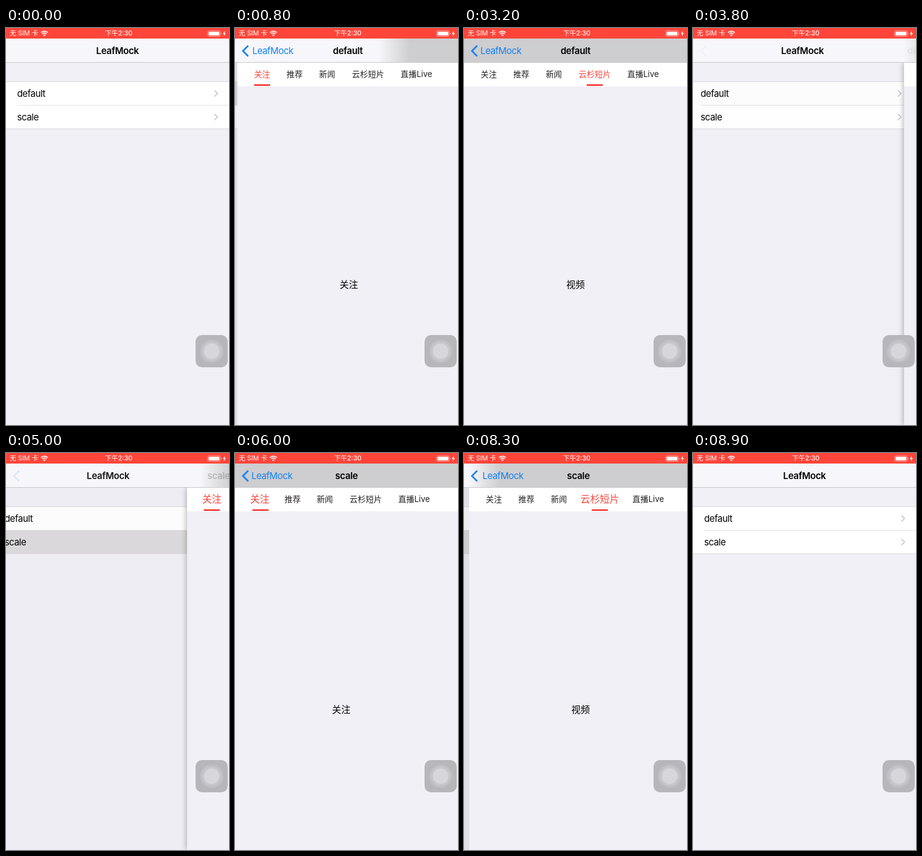
An HTML page that plays this animation: 360 px wide and 640 px high, repeating every 9300 ms.

```html
<!DOCTYPE html>
<html lang="zh">
<head>
<meta charset="utf-8">
<title>Tab pages</title>
<style>
  html, body { margin: 0; width: 100%; height: 100%; overflow: hidden; background: #f1f0f6; }
  #stage { position: relative; width: 360px; height: 640px; overflow: hidden; background: #f1f0f6;
    font: 14.8px/20px Inter, "Noto Sans CJK SC", "Noto Sans CJK", sans-serif; letter-spacing: -.45px; color: #000; }
  #stage div, #stage svg, #stage span { position: absolute; white-space: nowrap; }
  .fill { inset: 0; }
  .mid { transform: translate(-50%, -50%); }
  #list { left: 0; top: 56px; width: 360px; height: 584px; background: #f1f0f6; }
  #rows { top: 30px; width: 360px; height: 75px; background: #fff; border: solid #dad9de; border-width: 1px 0; }
  .row { left: 0; width: 360px; height: 38px; }
  .row span { left: 18px; top: 8.5px; }
  .row svg { left: 335px; top: 12px; }
  .rule { left: 18px; right: 0; top: 37px; height: 1px; background: #e3e2e6; }
  #dim { background: #000; }
  #page { left: 0; top: 56px; width: 360px; height: 584px; background: #f1f0f6; }
  #view { overflow: hidden; }
  #pages span { top: 358.2px; font-size: 15px; letter-spacing: 0; }
  #tabs { width: 360px; height: 38px; background: #fff; }
  #tabs span { top: 17.6px; font-size: 13px; letter-spacing: 0; }
  #line { left: -13px; top: 35px; width: 26px; height: 2px; background: #f5150f; }
  #nav { top: 17px; width: 360px; height: 39px; border-bottom: 1px solid #c9c8cd; box-sizing: border-box; }
  #nav span { top: 20px; }
  .bold { font-weight: 600; letter-spacing: -.3px; }
  #nav #back { top: 10px; color: #1282f5; }
  #status { width: 360px; height: 17px; background: #ff453a; color: #fff; font-size: 10.5px; letter-spacing: 0; }
  #touch { left: 306px; top: 495px; width: 52px; height: 52px; border-radius: 10.5px; background: #b7b6bb; }
  #touch div { left: 50%; top: 50%; border-radius: 50%; }
</style>
</head>
<body>
<div id="stage">
  <div id="list">
    <div id="rows">
      <div class="row"><span>default</span><svg width="8" height="13"><path d="M1.5 1.5 6.5 6.5 1.5 11.5" fill="none" stroke="#c5c4ca" stroke-width="1.6"/></svg></div>
      <div class="row" style="top:38px"><span>scale</span><svg width="8" height="13"><path d="M1.5 1.5 6.5 6.5 1.5 11.5" fill="none" stroke="#c5c4ca" stroke-width="1.6"/></svg></div>
      <div class="rule"></div>
    </div>
    <div id="dim" class="fill"></div>
  </div>
  <div id="page">
    <div id="view" class="fill">
      <div id="pages"></div>
      <div id="tabs"><div id="line"></div></div>
    </div>
  </div>
  <div id="nav">
    <svg id="arrow" width="26" height="38"><path d="M21.3 11.5 12.8 20 21.3 28.5" fill="none" stroke="#1282f5" stroke-width="2.6"/></svg>
    <span id="back">LeafMock</span>
    <span id="home" class="mid bold">LeafMock</span>
    <span id="title" class="mid bold"></span>
  </div>
  <div id="status">
    <span style="left:6px;top:-1.2px">无 SIM 卡</span>
    <svg width="360" height="17">
      <g fill="none" stroke="#fff" stroke-width="1.7">
        <path d="M56.4 7.4Q62 2.7 67.6 7.4M58.5 9.6Q62 6.7 65.5 9.6"/>
        <rect x="325.5" y="4.5" width="20.5" height="9" rx="2.2" stroke-width=".8" opacity=".6"/>
      </g>
      <path d="M60 11.3Q62 9.8 64 11.3L62 13.3Z" fill="#fff"/>
      <rect x="327" y="6" width="17.5" height="6" rx="1" fill="#fff"/>
      <path d="M347 7.5Q348.5 9 347 10.5ZM353.3 4.5 350 9.6H352.3L351.4 13.5 355 8.3H352.7Z" fill="#fff"/>
    </svg>
    <span class="mid" style="left:182px;top:8.8px;font-weight:500">下午2:30</span>
  </div>
  <div id="touch">
    <div class="mid" style="width:38px;height:38px;background:#bfbec3"></div>
    <div class="mid" style="width:32px;height:32px;background:#c7c6cb"></div>
    <div class="mid" style="width:25px;height:25px;background:#d7d6db"></div>
  </div>
</div>
<script>
const LOOP = 9300, STEP = 100, WIDTH = 360;
const $ = id => document.getElementById(id);
const clamp = v => Math.min(1, Math.max(0, v));
const mix = (a, b, k) => a + (b - a) * k;

const centers = [40, 92.5, 145, 211, 289];
const names = ['关注', '推荐', '新闻', '云杉短片', '直播Live'];
const labels = ['关注', '推荐', '新闻', '视频'];

// Each swipe: start time, then the distance scrolled at every step.
const visits = [
  { title: 'default', push: 500, pop: 3600, popLead: 41, zoom: 1, swipes: [
    [1700, 8, 144, 290, 345, 360], [2200, 85, 253, 332, 354, 360], [2800, 49, 211, 312, 350, 360]] },
  { title: 'scale', push: 5000, pop: 8300, popLead: 12, zoom: 1.2, swipes: [
    [6000, 8.5, 149, 293, 345, 360], [6600, 65, 235, 322, 352, 360], [7100, 3.5, 122, 276, 338, 358, 360]] }
];

function addText(parent, text, x) {
  const span = document.createElement('span');
  span.className = 'mid';
  span.textContent = text;
  span.style.left = x + 'px';
  return parent.appendChild(span);
}
const tabs = names.map((name, i) => addText($('tabs'), name, centers[i]));
labels.forEach((label, i) => addText($('pages'), label, 180 + WIDTH * i));
const rows = document.querySelectorAll('.row');

// Share of the way still to go in a critically damped spring.
function remaining(ms) {
  const w = ms * .0193;
  return (1 + w) * Math.exp(-w);
}

function coverage(t, v) {
  if (t < v.push) return 0;
  const p = t < v.pop ? 1 - remaining(t - v.push + 41) : remaining(t - v.pop + v.popLead);
  return p < .002 ? 0 : p > .998 ? 1 : p;
}

function scrolled(t, v) {
  return v.swipes.reduce((sum, [start, ...path]) => t < start ? sum :
    sum + path[Math.min(path.length - 1, Math.floor((t - start) / STEP))], 0);
}

function drawTabs(v, offset) {
  const at = offset / WIDTH, i = Math.floor(at);
  $('pages').style.transform = `translateX(${-offset}px)`;
  $('line').style.transform = `translateX(${mix(centers[i], centers[i + 1], at - i)}px)`;
  tabs.forEach((tab, n) => {
    const k = clamp(1 - Math.abs(at - n));
    tab.style.color = `rgb(${mix(34, 248, k)},${mix(34, 70, k)},${mix(34, 60, k)})`;
    tab.style.transform = `translate(-50%,-50%) scale(${mix(1, v.zoom, k)})`;
  });
}

function drawNav(t, v, p) {
  const step = (t - v.push) / STEP;
  const edge = p === 0 ? WIDTH : t < v.pop ? Math.max(-60, 313 - 3 * step ** 3) : WIDTH * (1 - p);
  $('nav').style.background = `linear-gradient(90deg,#f7f6fa ${edge}px,#cecdcf ${edge + 50}px)`;
  const shift = 117 * p ** 1.22;
  $('home').style.left = 180 - shift + 'px';
  $('home').style.opacity = clamp(1.2 - 1.5 * p);
  $('back').style.left = 143.5 - shift + 'px';
  $('back').style.opacity = clamp((p - .3) / .6);
  $('arrow').style.opacity = p ** 1.3;
  $('title').textContent = v.title;
  $('title').style.left = 180 + 201 * (1 - p) + 'px';
  $('title').style.opacity = p;
}

function draw(t) {
  const active = t < 4500 ? 0 : 1, v = visits[active], p = coverage(t, v);
  $('list').style.transform = `translateX(${-108 * p}px)`;
  $('dim').style.opacity = .07 * p;
  rows.forEach((row, i) => {
    const glow = i !== active || !p ? 0 : t < v.pop ? 1 : p;
    row.style.background = `rgba(221,219,222,${glow})`;
  });
  $('page').style.display = p ? 'block' : 'none';
  $('page').style.transform = `translateX(${WIDTH * (1 - p)}px)`;
  $('page').style.boxShadow = `-1px 0 8px rgba(0,0,0,${.35 * (1 - p)})`;
  drawTabs(v, scrolled(t, v));
  drawNav(t, v, p);
}

const begin = performance.now();
function tick() {
  const t = (performance.now() - begin) % LOOP;
  draw(Math.floor(t / STEP) * STEP);
  requestAnimationFrame(tick);
}
tick();
</script>
</body>
</html>
```
